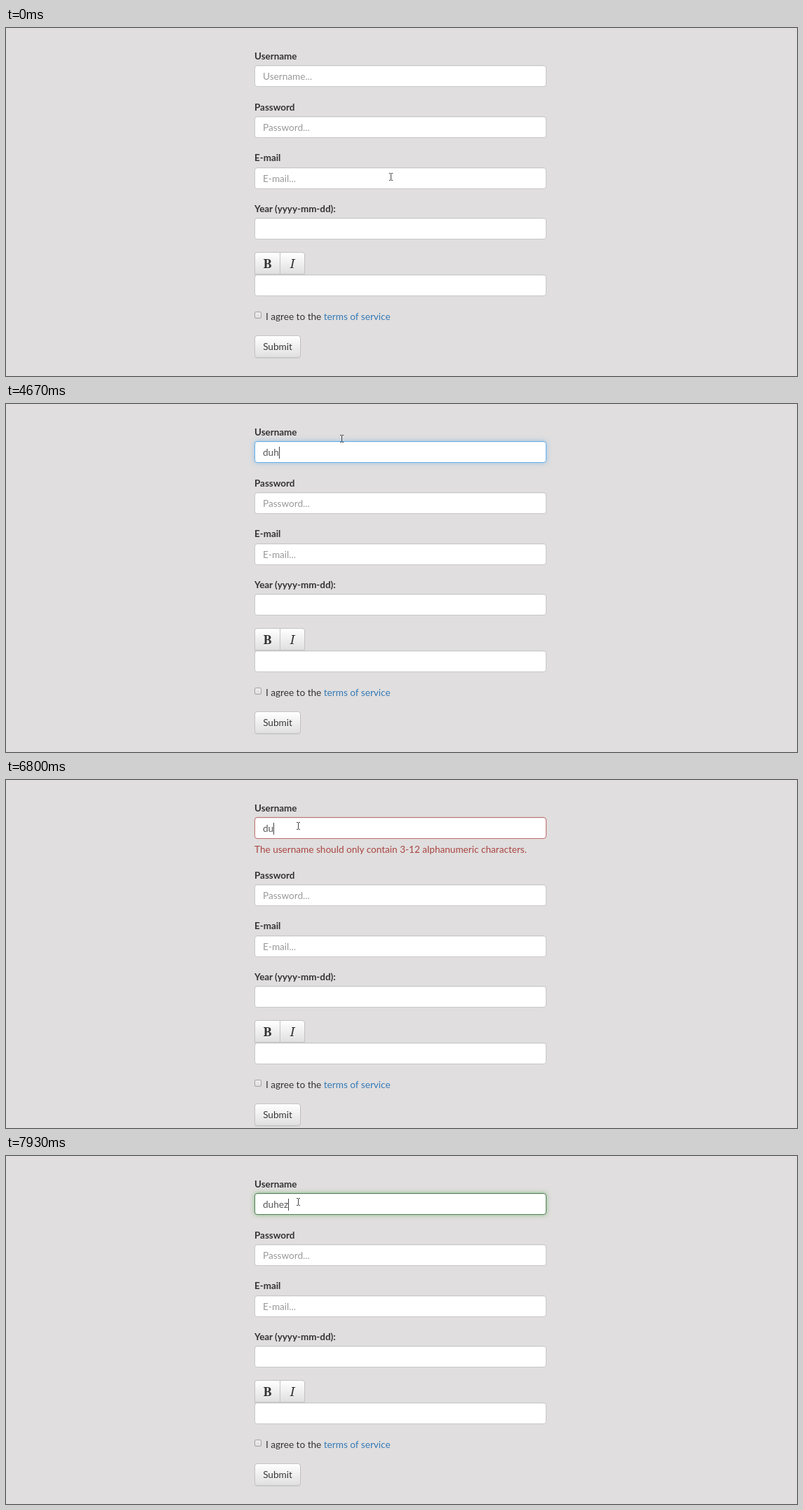
These frames come from a looping animation (1127 px wide and 497 px high, 8 s). An HTML page:

```html
<!DOCTYPE html>
<html lang="en">
<head>
<meta charset="utf-8">
<title>Sign-up form validation</title>
<style>
  html, body { margin: 0; width: 100%; height: 100%; overflow: hidden; }
  body { position: relative; background: #e0dede; color: #333; font: 13.6px/20px Lato, sans-serif; }
  body * { box-sizing: border-box; }
  .at { position: absolute; left: 354px; white-space: pre; }
  label { font-weight: 700; font-size: 13.4px; }
  .input {
    width: 416px; height: 31px; padding-left: 11px; line-height: 30px;
    border: 1px solid #c8c8c8; border-radius: 4px; background: #fff; color: #555;
    box-shadow: inset 0 1px 1px rgba(0, 0, 0, .075);
  }
  .hint { color: #999; }
  .error { color: #a94442; }
  .button {
    height: 32px; line-height: 31px; text-align: center; border: 1px solid #c4c4c4; border-radius: 4px;
    background: linear-gradient(#fff, #e0e0e0); box-shadow: 0 1px 1px rgba(0, 0, 0, .08);
    text-shadow: 0 1px 0 #fff;
  }
  .serif { font-family: "Noto Serif", serif; font-size: 18px; }
  .check { width: 10px; height: 10px; border: 1px solid #a5a5a5; border-radius: 2px; background: linear-gradient(#eee, #ddd); }
  .link { color: #337ab7; }
  #caret { display: inline-block; width: 1px; height: 17px; margin-right: -1px; background: #444; vertical-align: -4px; }
  #lower { position: absolute; left: 0; top: 0; }
  #cursor { position: absolute; left: 0; top: 0; overflow: visible; }
</style>
</head>
<body>
<label class="at" style="top:30px">Username</label>
<div class="at input" id="name" style="top:53px"><span id="typed"></span><span id="caret"></span><span id="hint" class="hint">Username...</span></div>
<div class="at error" id="error" style="top:89px">The username should only contain 3-12 alphanumeric characters.</div>
<div id="lower">
  <label class="at" style="top:103px">Password</label>
  <div class="at input hint" style="top:126px">Password...</div>
  <label class="at" style="top:175px">E-mail</label>
  <div class="at input hint" style="top:198.5px">E-mail...</div>
  <label class="at" style="top:248px">Year (yyyy-mm-dd):</label>
  <div class="at input" style="top:271px"></div>
  <div class="at button serif" style="top:320px;width:37px;border-radius:4px 0 0 0"><b>B</b></div>
  <div class="at button serif" style="top:320px;left:390px;width:36px;border-radius:0 4px 0 0"><i>I</i></div>
  <div class="at input" style="top:352px"></div>
  <div class="at check" style="top:405px"></div>
  <div class="at" style="top:402px;left:370px">I agree to the <span class="link">terms of service</span></div>
  <div class="at button" style="top:439px;width:66px">Submit</div>
</div>
<svg id="cursor" width="12" height="16">
  <path id="beam" d="M-2 -4.5H0M1 -4.5H3M-2 5.5H0M1 5.5H3M.5 -4V5" fill="none" stroke="#444"/>
  <path id="arrow" d="M.5 .5V9.5L2.5 7.7L3.8 10.6L5.2 10L3.9 7.2H6.4Z" fill="#fff" stroke="#333" stroke-width=".9"/>
</svg>
<script>
const $ = id => document.getElementById(id);
const LOOP = 8000, FPS = 15; // all times below are in ticks of 1/15 s

// [tick, x, y, pointer shape from here on]
const pointer = [
  [0, 548, 212, 'beam'], [1, 557, 200, 'beam'], [2, 576, 165, 'arrow'], [3, 581, 130, 'arrow'],
  [5, 522, 68, 'beam'], [6, 484, 52, 'beam'], [7, 478, 50, 'beam'], [9, 478, 50, 'beam'],
  [10, 478, 49, 'beam'], [83, 478, 49, 'beam'], [84, 476, 43, 'arrow'], [86, 430, 50, 'arrow'],
  [88, 325, 74, 'arrow'], [90, 284, 83, 'arrow'], [95, 284, 83, 'arrow'], [98, 365, 72, 'beam'],
  [101, 416, 65, 'beam']
];
const typing = [[0, ''], [50, 'd'], [51, 'du'], [54, 'duh'], [74, 'du'], [115, 'duh'], [116, 'duhe'], [117, 'duhez']];
const blink = [[0, 0], [34, 1], [42, 0], [50, 1], [61, 0], [70, 1], [77, 0], [85, 1], [93, 0], [102, 1], [110, 0], [115, 1]];

// border rgb, glow rgb, glow alpha, blur, spread
const plain = [200, 200, 200, 102, 175, 233, 0, 0, 0];
const focus = [102, 175, 233, 102, 175, 233, .6, 7, 0];
const leaving = [102, 175, 233, 102, 175, 233, .3, 4, 0];
const invalid = [169, 68, 66, 206, 132, 131, 0, 0, 0];
const invalidFocus = [238, 212, 211, 216, 152, 150, .75, 2, 1];
const valid = [84, 128, 84, 103, 177, 104, .75, 6, 0];
const looks = [[0, plain], [34, plain], [37, focus], [92, focus], [93, leaving], [95, invalid], [101, invalid],
  [104, invalidFocus], [116, invalidFocus], [119, valid]];

const last = (keys, tick) => keys.findLastIndex(key => key[0] <= tick);
const held = (keys, tick) => keys[last(keys, tick)][1];

function between(keys, tick, read) {
  const i = last(keys, tick), a = keys[i], b = keys[i + 1] || a;
  const p = a === b ? 0 : (tick - a[0]) / (b[0] - a[0]);
  return read(a).map((v, k) => v + (read(b)[k] - v) * p);
}

function draw(time) {
  const tick = Math.floor((time % LOOP + 4) * FPS / 1000);
  const text = held(typing, tick);
  $('typed').textContent = text;
  $('hint').hidden = text !== '';
  $('caret').style.opacity = held(blink, tick);

  const wrong = tick >= 93 && tick < 117;
  $('error').hidden = !wrong;
  $('lower').style.top = wrong ? '23px' : 0;

  const [r, g, b, gr, gg, gb, alpha, blur, spread] = between(looks, tick, key => key[1]);
  $('name').style.borderColor = `rgb(${r}, ${g}, ${b})`;
  $('name').style.boxShadow = `inset 0 1px 1px rgba(0, 0, 0, .075), 0 0 ${blur}px ${spread}px rgba(${gr}, ${gg}, ${gb}, ${alpha})`;

  const [x, y] = between(pointer, tick, key => [key[1], key[2]]).map(Math.round);
  const shape = pointer[last(pointer, tick)][3];
  $('cursor').style.transform = `translate(${x}px, ${y}px)`;
  for (const id of ['beam', 'arrow']) $(id).style.display = id === shape ? '' : 'none';
}

const start = performance.now();
function frame() {
  draw(performance.now() - start);
  requestAnimationFrame(frame);
}
frame();
</script>
</body>
</html>
```
